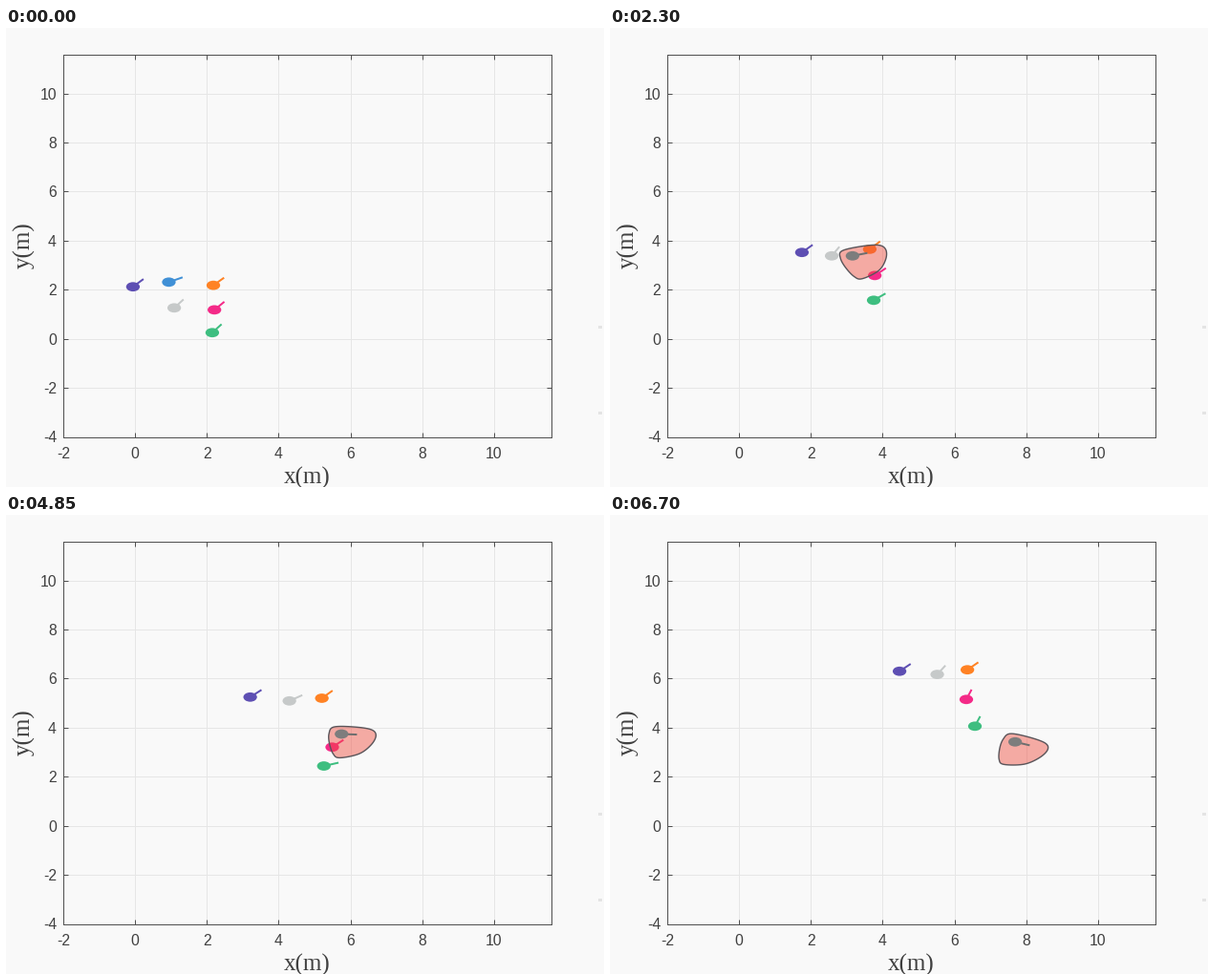
Recreate the animation shown at these times as a matplotlib script. Size 626x481 px, loop 6.85 s.

```python
import numpy as np
import matplotlib.pyplot as plt
from matplotlib.animation import FuncAnimation
from matplotlib.patches import Circle, Polygon

W, H, DPI = 626, 481, 64           # a power of two keeps the pixel size exact
STEP, FRAMES = 50, 137
PX = 72 / DPI                      # one pixel in points
LEFT, RIGHT, TOP, BOTTOM = 60, 571, 27.5, 428.5
X_LIM, Y_LIM = (-2, 11.6), (-4, 11.6)

RADIUS, ARM = 0.19, 0.43           # robot size in metres
FAULT_MS, PAUSE_MS, END_MS = 500, 3200, 6700
DEAD = "#7d7d7d"
INK, FRAME = "#404040", "#505050"

TIMES = np.array([0, 1000, 2300, 3200, 4150, 5500, 6700])

# colour, x (m), y (m), heading (degrees) at TIMES
ROBOTS = {
    "purple": ("#5e4fb3",
               [-0.06, 0.74, 1.75, 2.26, 2.79, 3.62, 4.47],
               [2.12, 2.86, 3.52, 4.16, 4.82, 5.62, 6.30],
               [47, 34, 46, 54, 50, 38, 44]),
    "silver": ("#c6c9c9",
               [1.09, 1.89, 2.58, 3.19, 3.83, 4.73, 5.52],
               [1.26, 2.16, 3.38, 4.16, 4.77, 5.39, 6.17],
               [53, 58, 60, 48, 38, 34, 58]),
    "orange": ("#ff8224",
               [2.18, 2.82, 3.64, 4.20, 4.79, 5.59, 6.36],
               [2.18, 2.82, 3.65, 4.22, 4.80, 5.58, 6.36],
               [46, 46, 48, 46, 46, 46, 45]),
    "pink": ("#f42a88",
             [2.21, 2.82, 3.78, 4.28, 5.03, 5.85, 6.33],
             [1.18, 1.90, 2.58, 2.90, 3.01, 3.60, 5.15],
             [50, 40, 44, 4, 22, 61, 70]),
    "green": ("#3ebe80",
              [2.15, 2.79, 3.75, 4.31, 4.76, 5.76, 6.57],
              [0.25, 0.91, 1.57, 2.12, 2.37, 2.66, 4.06],
              [53, 38, 40, 46, 9, 39, 70]),
    "blue": ("#4090d6",
             [0.94, 1.86, 3.16, 4.07, 5.05, 6.41, 7.69],
             [2.31, 2.82, 3.38, 3.62, 3.73, 3.69, 3.42],
             [27, 31, 16, 9, 1, -7, -19]),
}

# danger zone around the faulty robot, for heading 0
ZONE = np.array([(-0.35, 0), (-0.24, 0.27), (0.27, 0.31), (0.80, 0.23),
                 (0.96, 0), (0.85, -0.39), (0.53, -0.78), (0, -0.97),
                 (-0.19, -0.82), (-0.32, -0.39)])


def spline(t, knots, values):
    """Cubic Hermite curve through values at knots."""
    values = np.asarray(values, float)
    slopes = np.gradient(values, knots)
    i = np.clip(np.searchsorted(knots, t, side="right") - 1, 0, len(knots) - 2)
    h = knots[i + 1] - knots[i]
    u = (t - knots[i]) / h
    return ((1 + 2 * u) * (1 - u) ** 2 * values[i]
            + u * (1 - u) ** 2 * h * slopes[i]
            + u * u * (3 - 2 * u) * values[i + 1]
            + u * u * (u - 1) * h * slopes[i + 1])


def closed_curve(points, samples=100):
    n = len(points)
    wrapped = np.vstack([points[-2:], points, points[:3]])
    knots = np.arange(-2, n + 3)
    t = np.linspace(0, n, samples, endpoint=False)
    return np.column_stack([spline(t, knots, c) for c in wrapped.T])


def label(x, y, text, size, family, **kw):
    fig.text(x / W, 1 - y / H, text, fontsize=size * PX, family=family,
             va="baseline", color=INK, **kw)


def dot(x, y):
    fig.add_artist(plt.Rectangle(((x - 2) / W, 1 - (y + 1.5) / H), 4 / W, 3 / H,
                                 color="#e4e4e4", lw=0))


fig = plt.figure(figsize=(W / DPI, H / DPI), dpi=DPI, facecolor="#f9f9f9")
ax = fig.add_axes([LEFT / W, 1 - BOTTOM / H, (RIGHT - LEFT) / W, (BOTTOM - TOP) / H],
                  facecolor="#f9f9f9")
ax.set(xlim=X_LIM, ylim=Y_LIM, xticks=range(-2, 11, 2), yticks=range(-4, 11, 2))
ax.set_axisbelow(True)
ax.grid(color="#e6e6e6", lw=PX)
ax.tick_params(direction="in", length=5 * PX, width=PX, color=FRAME, top=True,
               right=True, labelbottom=False, labelleft=False)
for spine in ax.spines.values():
    spine.set(color=FRAME, linewidth=PX)

for v in range(-2, 11, 2):
    x = LEFT + (v - X_LIM[0]) * (RIGHT - LEFT) / (X_LIM[1] - X_LIM[0])
    label(x, 451, str(v), 15.7, "Liberation Sans", ha="center")
for v in range(-4, 11, 2):
    y = BOTTOM - (v - Y_LIM[0]) * (BOTTOM - TOP) / (Y_LIM[1] - Y_LIM[0])
    label(53, y + 6, str(v), 15.7, "Liberation Sans", ha="right")
label(315.5, 478, "x(m)", 25, "Liberation Serif", ha="center")
label(25, 228, "y(m)", 25, "Liberation Serif", ha="center",
      rotation=90, rotation_mode="anchor")
dot(622, 313)
dot(622, 403)

outline = closed_curve(ZONE)
zone = ax.add_patch(Polygon(outline, closed=True, fc=(0.94, 0.29, 0.235, 0.45),
                            ec="#5a555a", lw=1.4 * PX, zorder=4))
shapes = {}
for name, (color, *_) in ROBOTS.items():
    z = 5 if name == "blue" else 3
    arm, = ax.plot([], [], color=color, lw=2 * PX, zorder=z, solid_capstyle="butt")
    body = ax.add_patch(Circle((0, 0), RADIUS, fc=color, lw=0, zorder=z))
    shapes[name] = arm, body


def update(i):
    t = min(i * STEP, END_MS)
    if t == PAUSE_MS + STEP:
        t = PAUSE_MS
    for name, (color, *tracks) in ROBOTS.items():
        x, y, a = (spline(t, TIMES, track) for track in tracks)
        c, s = np.cos(np.radians(a)), np.sin(np.radians(a))
        arm, body = shapes[name]
        arm.set_data([x, x + ARM * c], [y, y + ARM * s])
        body.center = x, y
        if name == "blue":
            failed = t >= FAULT_MS
            arm.set_color("#6e6e6e" if failed else color)
            body.set_facecolor(DEAD if failed else color)
            zone.set_visible(failed)
            zone.set_xy(outline @ np.array([[c, s], [-s, c]]) + (x, y))
    return []


anim = FuncAnimation(fig, update, frames=FRAMES, interval=STEP, repeat=True,
                     repeat_delay=0, init_func=lambda: update(0))
plt.show()
```
